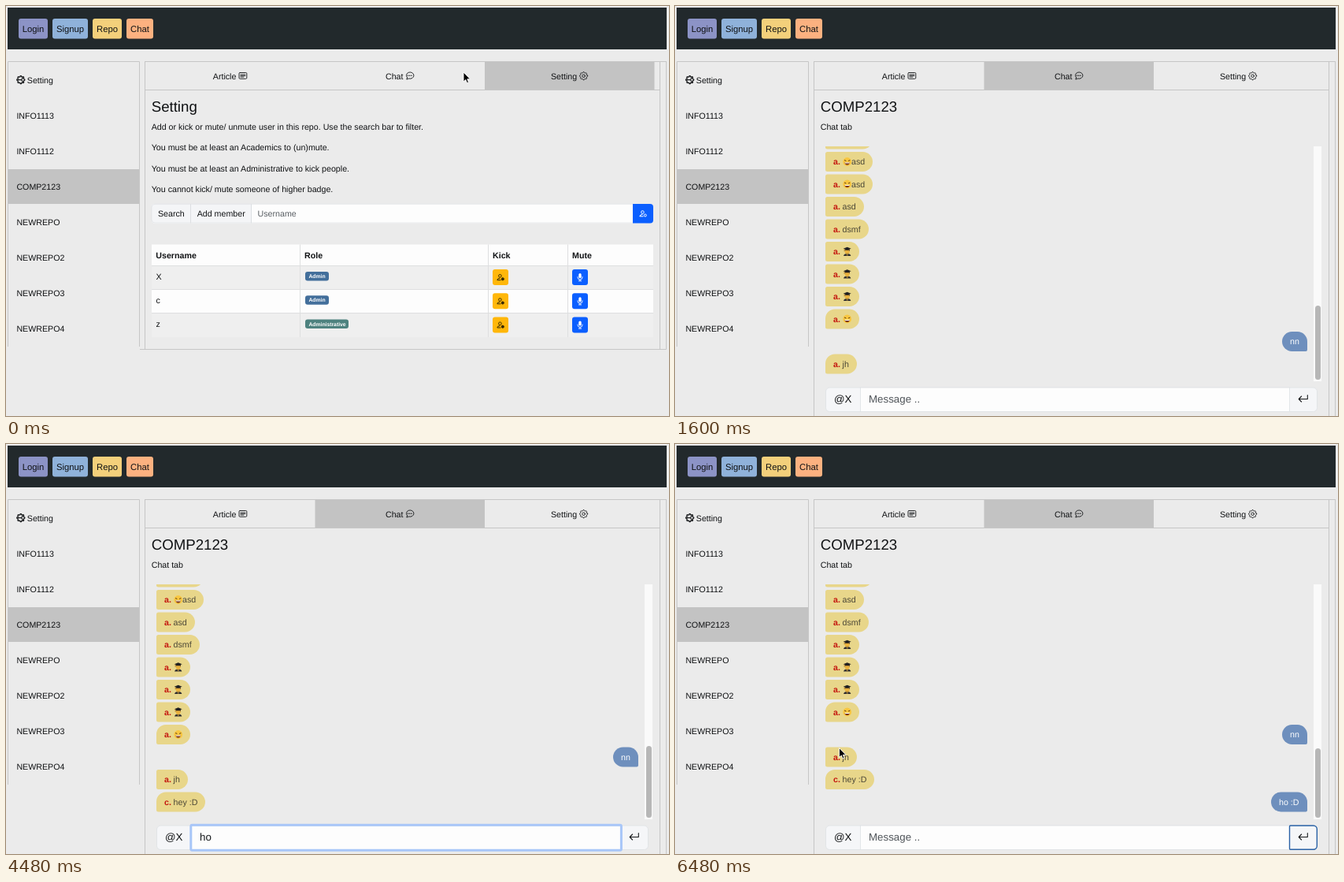
Write an HTML page that moves like this. It is 842x520 px and loops after 6.56 s.

```html
<!DOCTYPE html>
<html lang="en">
<head>
<meta charset="utf-8">
<title>Repo chat</title>
<style>
  html, body { margin: 0; width: 100%; height: 100%; overflow: hidden; background: #ebebeb; }
  svg { display: block; width: 842px; height: 520px; }
  text { font-family: "Liberation Sans", Arial, Helvetica, sans-serif; font-size: 10.67px; fill: #101214; white-space: pre; text-rendering: geometricPrecision; }
  .b { font-weight: 700; }
  .line { fill: none; stroke: #c6c6c6; }
  .ico { fill: none; stroke: #16181a; stroke-width: .9; stroke-linecap: round; stroke-linejoin: round; }
</style>
</head>
<body>
<svg id="stage" viewBox="0 0 842 520" xmlns="http://www.w3.org/2000/svg"></svg>
<script>
const LOOP = 6560;
const ROW = 28.5;
const stage = document.getElementById('stage');

const rect = (x, y, w, h, fill, r = 0, more = '') =>
  `<rect x="${x}" y="${y}" width="${w}" height="${h}" rx="${r}" fill="${fill}" ${more}/>`;
const text = (x, y, s, more = '') => `<text x="${x}" y="${y}" ${more}>${s}</text>`;
const line = d => `<path class="line" d="${d}"/>`;
const use = (id, x, y, more = '') => `<use href="#${id}" x="${x}" y="${y}" ${more}/>`;

// Box with one radius per corner: top left, top right, bottom right, bottom left
const box = (x, y, w, h, [a, b, c, d]) =>
  `M${x + a} ${y}H${x + w - b}a${b} ${b} 0 0 1 ${b} ${b}V${y + h - c}a${c} ${c} 0 0 1 ${-c} ${c}` +
  `H${x + d}a${d} ${d} 0 0 1 ${-d} ${-d}V${y + a}a${a} ${a} 0 0 1 ${a} ${-a}z`;

function gear(r, teeth, depth) {
  let d = '';
  for (let i = 0; i < teeth * 4; i++) {
    const a = (i - .5) * Math.PI / (teeth * 2);
    const k = i % 4 < 2 ? r : r - depth;
    d += (i ? 'L' : 'M') + (k * Math.cos(a)).toFixed(2) + ' ' + (k * Math.sin(a)).toFixed(2);
  }
  return d + 'z';
}

const defs = `<defs>
  <clipPath id="log"><rect x="185" y="178" width="626" height="298"/></clipPath>
  <g id="card" class="ico"><rect x=".5" y="1.2" width="9.8" height="7.8" rx="1.2"/><path d="M2.4 3.6H8.4M2.4 5.2H8.4M2.4 6.8H6.4"/></g>
  <g id="talk" class="ico"><path d="M2.3 7.7A4.8 4.1 0 1 1 4.3 8.8Q3 9.8 1.3 9.7Q2.3 8.9 2.3 7.7z"/><path d="M3.2 5h.01M5.4 5h.01M7.6 5h.01" stroke-width="1.5"/></g>
  <g id="gear" class="ico"><path d="${gear(5.1, 8, 1)}"/><circle r="1.8"/></g>
  <g id="wheel" class="ico" stroke-width="1.3"><path d="${gear(5, 8, 1.1)}" stroke-width="1.3"/><path d="M-3.4 0H.8L2.5-2.7M.8 0 2.5 2.7" stroke-width="1.1"/></g>
  <g id="user" fill="none" stroke-width="1"><circle cx="-.9" cy="-2" r="1.8"/><path d="M-4.5 3.3Q-4.2.9-.8.9M-4.5 3.3H.2"/><circle cx="2.5" cy="2" r="1.5"/></g>
  <g id="mic"><rect x="-1.7" y="-5" width="3.4" height="6.2" rx="1.7" fill="#fff"/><path d="M-3-.8V0a3 3 0 0 0 6 0V-.8M0 3V4.7M-2 4.7H2" fill="none" stroke="#fff" stroke-width=".9"/></g>
  <g id="grin"><circle r="5.4" fill="#f8c640"/><path d="M-3.6-1.9 -1.4-1.1M3.6-1.9 1.4-1.1" stroke="#5d3a12" stroke-width="1"/><path d="M-3.4 .9H3.4Q2.6 4 0 4T-3.4 .9z" fill="#7b3518"/><path d="M-3 .9H3V2H-3z" fill="#fff"/></g>
  <g id="grad"><path d="M-4.6 5.6Q-4.2 2.6 0 2.6T4.6 5.6z" fill="#2e2d30"/><circle cy="-.2" r="3.1" fill="#e9b13d"/><path d="M-3.2-.4V-3H3.2V-.4L2.3-1.7H-2.3z" fill="#3a2a1c"/><path d="M-5-3.7 0-5.7 5-3.7 0-2z" fill="#1e1f22"/><path d="M-3.9-3.4V0M-1 3 0 5 1 3" stroke="#d9a53a" stroke-width=".7" fill="none"/></g>
  <g id="arrow"><path d="M0 0V12L2.8 9.5 4.5 13.5 6.5 12.7 4.8 8.8H8.5z" fill="#000" stroke="#fff" stroke-width=".9" stroke-linejoin="round"/></g>
  <g id="hand"><path d="M-1.2 1Q-1.2-.2 0-.2T1.3 1V4.2Q2.2 3.5 3.4 4.6 4.6 4 5.3 5.2 7.3 4.8 7.2 6.8 7.2 9.4 5.8 11.1V13H-.5V11.9Q-2.4 9.5-4.2 7.3-4.7 6-3.4 5.8-2.2 5.9-1.2 7.2z" fill="#fff" stroke="#111" stroke-width="1" stroke-linejoin="round"/><path d="M1.3 4.5V7M3.4 5V7M5.3 5.4V7.2M1.2 9V11M3 9V11M4.7 9V11" stroke="#111" stroke-width=".7"/></g>
  <g id="beam"><path d="M-2.8-6Q0-6 0-4.4 0-6 2.8-6M0-4.4V5M-2.8 6.5Q0 6.5 0 5 0 6.5 2.8 6.5M-1.3 2.6H1.3" fill="none" stroke="#222" stroke-width="1.1"/></g>
</defs>`;

const links = [['Login', 16, 37, '#8c93c6'], ['Signup', 59, 45, '#8fb2da'], ['Repo', 110, 37, '#f3d07b'], ['Chat', 153, 34, '#fcb180']];
const repos = ['INFO1113', 'INFO1112', 'COMP2123', 'NEWREPO', 'NEWREPO2', 'NEWREPO3', 'NEWREPO4'];

const header = rect(2, 2, 837, 53, '#22292c') + links.map(([s, x, w, c]) =>
  rect(x, 16, w, 25.5, c, 3) + text(x + w / 2, 32.5, s, 'text-anchor="middle" style="font-size:11.3px"')).join('');

const side = rect(2, 207, 167.5, 44, '#c3c3c3') + use('wheel', 18.8, 93.6) + text(26.8, 97.5, 'Setting') +
  repos.map((s, i) => text(13.4, (142.5 + i * 45.1).toFixed(1), s)).join('') +
  line('M2.5 432V70.5H169.5V432');

const tabs = rect(392.5, 71, 215.5, 35, '#c3c3c3', 0, 'id="chatTab"') + rect(608, 71, 215.5, 35, '#c3c3c3', 0, 'id="setTab"') +
  text(262.8, 92.5, 'Article') + use('card', 295.5, 83.3) +
  text(482, 92.5, 'Chat') + use('talk', 507.3, 83.2) +
  text(692, 92.5, 'Setting') + use('gear', 733.6, 88.7) +
  line('M176.5 70.5H838.5M176.5 106.5H830.5');

const notes = ['Add or kick or mute/ unmute user in this repo. Use the search bar to filter.',
  'You must be at least an Academics to (un)mute.',
  'You must be at least an Administrative to kick people.',
  'You cannot kick/ mute someone of higher badge.'];
const members = [['X', 'Admin', 30, '#436f9b'], ['c', 'Admin', 30, '#436f9b'], ['z', 'Administrative', 55, '#4e827f']];

const settingView = `<g id="settingView">` +
  line('M176.5 70V435M830.5 70V435M838.5 70V435.5H170') +
  text(184.7, 134.3, 'Setting', 'style="font-size:18.67px"') +
  notes.map((s, i) => text(184.7, 156.6 + i * 26.5, s)).join('') +
  rect(185, 251, 630, 24.5, '#fdfdfd', 4) +
  `<path d="${box(185, 251, 126.5, 24.5, [4, 0, 0, 4])}" fill="#f4f5f7"/>` +
  `<path d="${box(796, 251, 26, 24.5, [0, 4, 4, 0])}" fill="#0b5fff"/>` +
  `<path d="M234.5 251V275.5M311.5 251V275.5" stroke="#dcdfe2"/>` +
  `<path d="M796 251.3H189a4 4 0 0 0-4 4V271a4 4 0 0 0 4 4H796" fill="none" stroke="#dfe1e4" stroke-width=".7"/>` +
  text(193, 267, 'Search') + text(242.7, 267, 'Add member') + text(319.6, 267, 'Username', 'style="fill:#5a5f64"') +
  use('user', 809.3, 263.5, 'stroke="#fff"') +
  rect(185, 302.5, 637, 27, '#fdfdfd') + rect(185, 329.5, 637, 30, '#efefef') +
  rect(185, 359.5, 637, 30, '#fdfdfd') + rect(185, 389.5, 637, 30.5, '#efefef') +
  `<path d="M185 329.5H822M185 359.5H822M185 389.5H822M373.5 302.5V420M612.5 302.5V420M713.5 302.5V420" stroke="#dedfe0" fill="none"/>` +
  [['Username', 190.3], ['Role', 379], ['Kick', 618], ['Mute', 719]].map(([s, x]) => text(x, 319.6, s, 'class="b"')).join('') +
  members.map(([name, role, w, c], i) => {
    const y = i * 30.2;
    return text(190.5, 346.6 + y, name) + rect(380, 337 + y, w, 11.5, c, 3) +
      text(384.4, 345.2 + y, role, 'class="b" style="font-size:6.8px;fill:#fff"') +
      rect(618, 334 + y, 20, 20, '#ffb70a', 3) + use('user', 628.3, 344.3 + y, 'stroke="#3a2c05"') +
      `<circle cx="630.8" cy="${346.3 + y}" r="1.8" fill="#3a2c05"/>` +
      rect(719, 334 + y, 20, 20, '#0b5fff', 3) + use('mic', 729, 344 + y);
  }).join('') + `</g>`;

// sender (blank for own), words, emoji, bubble width
const smile = ['a', 'asd', 'grin', 60], cap = ['a', '', 'grad', 43];
const messages = [smile, smile, smile, ['a', 'asd', '', 49], ['a', 'dsmf', '', 55], cap, cap, cap,
  ['a', '', 'grin', 43], ['', 'nn', '', 32], ['a', 'jh', '', 40], ['c', 'hey :D', '', 62], ['', 'ho :D', '', 46]];

function bubble([who, words, emoji, w], last) {
  if (!who) {
    return `<path d="${box(803 - w, -12.5, w, 25, [12.5, 12.5, 2, 12.5])}" fill="#6e8fbd"/>` +
      text(813 - w, 3.8, words, 'style="fill:#fff"');
  }
  return `<path d="${box(191, -12.5, w, 25, [last ? 12 : 2.5, 12.5, 12.5, 2.5])}" fill="#e8d68a"/>` +
    text(201, 3.8, who + '.', 'class="b" style="fill:#c4170f"') +
    (emoji ? use(emoji, 218.7, 0) : '') +
    text(emoji ? 224 : 212.6, 3.8, words, 'style="fill:#4a4636"');
}

const chatView = `<g id="chatView">` +
  line('M176.5 70V520M830.5 70V520M838.5 70V520') +
  text(184.7, 134.3, 'COMP2123', 'style="font-size:18.67px"') + text(184.7, 156.6, 'Chat tab') +
  `<g id="list" clip-path="url(#log)"></g>` +
  rect(811, 178, 10, 298, '#fafafa') + rect(813, 380, 7, 94, '#b7b7b7', 3.5, 'id="thumb"') +
  rect(191.5, 484, 624, 30.5, '#f5f6f8', 5, 'stroke="#dee1e4" stroke-width=".8"') +
  rect(235.5, 484, 545, 30.5, '#fdfdfd', 0, 'stroke="#dee1e4" stroke-width=".8"') +
  rect(234.8, 483.2, 546.6, 32, 'none', 1.5, 'id="ring" stroke="#a8c6f8" stroke-width="3"') +
  `<path id="focus" d="${box(780.5, 484, 34.8, 30.2, [1, 4.5, 4.5, 1])}" fill="#f5f6f8" stroke="#2a62a6" stroke-width="1.4"/>` +
  text(202, 503.3, '@X', 'style="font-size:13.33px"') +
  text(246, 503.3, '', 'id="field" style="font-size:13.33px"') +
  rect(0, 491, 1, 15, '#111', 0, 'id="caret"') +
  `<path class="ico" d="M803.3 493.5V498.5H792.3M795.6 495 792.2 498.5 795.6 502" style="stroke-width:1.1"/></g>`;

stage.innerHTML = defs + rect(0, 0, 842, 520, '#ebebeb') + header + side + tabs + settingView + chatView + `<use id="mouse"/>`;
const el = Object.fromEntries([...stage.querySelectorAll('[id]')].map(e => [e.id, e]));

const clamp = v => Math.max(0, Math.min(1, v));
const span = (t, a, b) => clamp((t - a) / (b - a));
const ease = p => p * p * (3 - 2 * p);
const show = (e, on) => e.setAttribute('display', on ? 'inline' : 'none');
const grey = (from, to, p) => { const v = Math.round(from + (to - from) * p); return `rgb(${v},${v},${v})`; };

const keys = [[3760, 'h'], [3920, 'ho'], [4800, 'ho '], [4960, 'ho :'], [5120, 'ho :D'], [5520, '']];
const typed = t => keys.reduce((s, [at, v]) => t >= at ? v : s, '');

// start, end, from x, y, to x, y; the pointer rests until "until"
const moves = [
  [0, 320, 581, 84, 572, 85, 560],
  [480, 720, 572, 85, 556.5, 85, 1040],
  [1040, 1440, 556.5, 85, 545, 530, 1440],
  [3000, 3200, 300, 522, 292, 495, 3760],
  [5600, 6080, 292, 495, 211, 386.5, 6480],
  [6480, 6481, 208.5, 385.5, 208.5, 385.5, LOOP]
];

function drawMouse(t) {
  const m = moves.filter(m => t >= m[0] && t < m[6]).pop();
  show(el.mouse, m);
  if (!m) return;
  const p = ease(span(t, m[0], m[1]));
  const x = m[2] + (m[4] - m[2]) * p, y = m[3] + (m[5] - m[3]) * p;
  const kind = y > 484 ? 'beam' : y < 106 && x < 580 ? 'hand' : 'arrow';
  el.mouse.setAttribute('href', '#' + kind);
  el.mouse.setAttribute('transform', `translate(${x.toFixed(2)} ${y.toFixed(2)})`);
}

let shown = 0;
function drawList(count) {
  if (count === shown) return;
  shown = count;
  el.list.innerHTML = messages.slice(0, count).map((m, i) => {
    const last = i === count - 1 || !messages[i + 1][0];
    return `<g transform="translate(0 ${454 - ROW * (count - 1 - i)})">${bubble(m, last)}</g>`;
  }).join('');
  const top = 380 + 3 * (count - 11);
  el.thumb.setAttribute('y', top);
  el.thumb.setAttribute('height', 474 - top);
}

function draw(t) {
  const chat = t >= 880;
  show(el.settingView, !chat);
  show(el.chatView, chat);
  el.chatTab.setAttribute('fill', grey(235, 195, chat ? .57 + .43 * span(t, 880, 1040) : 0));
  el.setTab.setAttribute('fill', grey(195, 235, chat ? .15 + .85 * span(t, 880, 1040) : 0));
  drawList(t >= 5520 ? 13 : t >= 2320 ? 12 : 11);

  const value = typed(t);
  el.field.textContent = value || 'Message ..';
  el.field.style.fill = value ? '#16191c' : '#50555a';
  el.ring.setAttribute('opacity', span(t, 3180, 3270) * (1 - span(t, 5380, 5520)));
  show(el.focus, t >= 5360);

  const blink = t < 3760 ? (t - 3200) % 1000 < 500 : t < 4480 || t >= 4800;
  show(el.caret, t >= 3200 && t < 5360 && blink);
  el.caret.setAttribute('x', value ? 246.7 + el.field.getComputedTextLength() : 246);
  drawMouse(t);
}

const start = performance.now();
function tick() {
  draw((performance.now() - start) % LOOP);
  requestAnimationFrame(tick);
}
tick();
</script>
</body>
</html>
```
